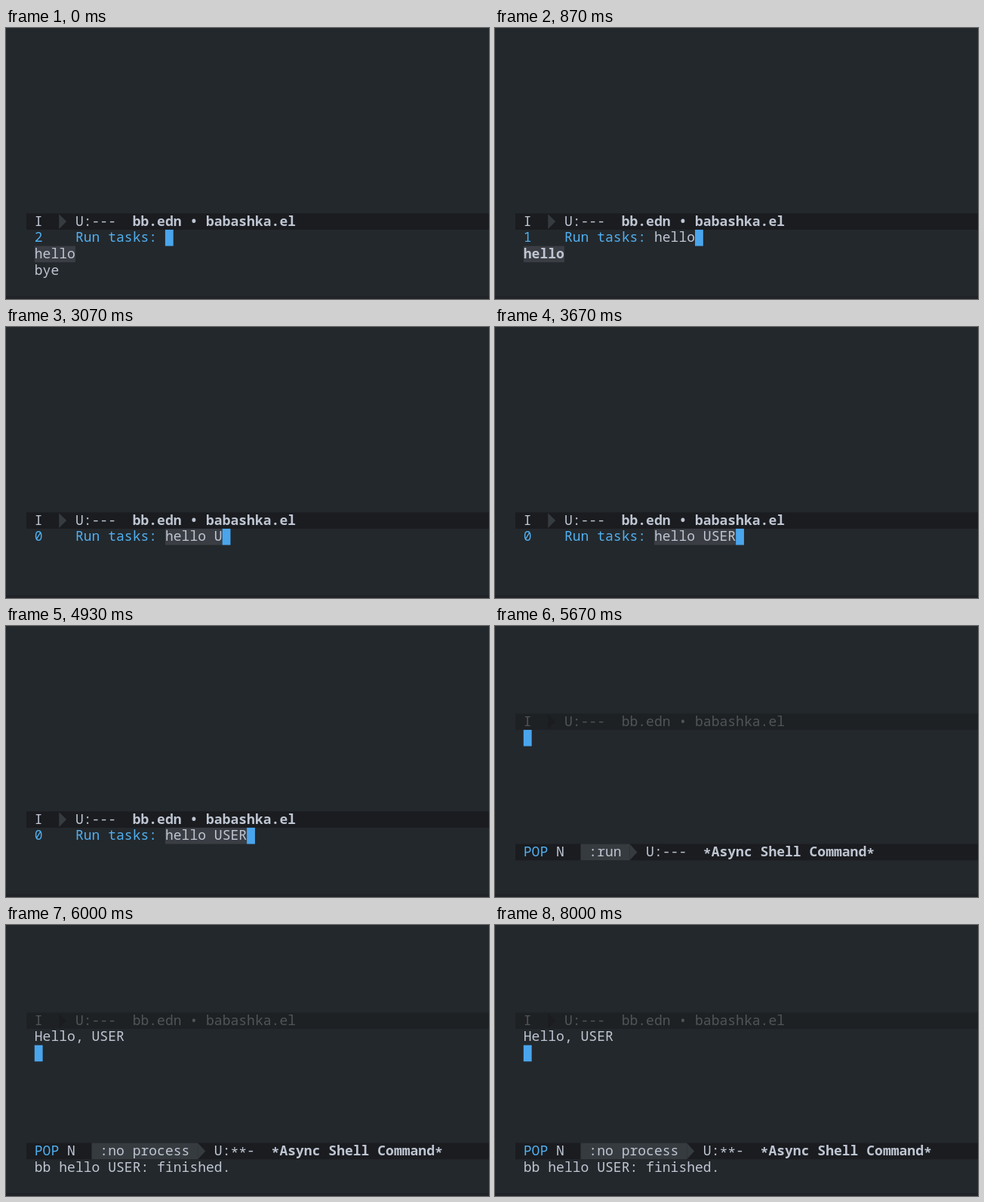
These frames come from a looping animation (640x360 px, 8.94 s). An HTML page with a canvas:

```html
<!DOCTYPE html>
<html lang="en">
<head>
<meta charset="utf-8">
<title>Run tasks</title>
<style>
  html, body { margin: 0; width: 100%; height: 100%; overflow: hidden; background: #23282c; }
  canvas { display: block; }
</style>
</head>
<body>
<canvas id="stage" width="640" height="360"></canvas>
<script>
const ctx = document.getElementById('stage').getContext('2d');
const LOOP = 8940;
const CELL = 10.82, ROW = 21.66, LEFT = 37.8, TOP = 116.3;
const BG = '#23282c', BAR = '#1a1c20', DIM_BAR = '#1e2124', EDGE = '#202428';
const FG = '#bfc6d2', DIM = '#505458', BLUE = '#51afef', CURSOR = '#4aa5ec';
const HIGHLIGHT = '#3a3d43', SEGMENT = '#363b40';

// Time at which each character of the input appears
const INPUT = 'hello USER';
const KEY_TIMES = [70, 270, 400, 600, 800, 1000, 3000, 3200, 3470, 3600];
const POPUP = 5670, FINISHED = 5800;

const colX = col => LEFT + col * CELL;
const rowY = row => TOP + row * ROW;

function fill(x, y, w, h, color) {
  ctx.fillStyle = color;
  ctx.fillRect(x, y, w, h);
}

function cells(col, row, count, color) {
  fill(colX(col), rowY(row), count * CELL, ROW, color);
}

function text(str, col, row, color = FG, weight = 500) {
  ctx.font = `${weight} 18px "Noto Sans Mono", monospace`;
  ctx.fillStyle = color;
  [...str].forEach((ch, i) => {
    const drop = ch === '*' ? 3 : 0; // asterisks sit at mid-height
    ctx.fillText(ch, colX(col + i), rowY(row) + 16.4 + drop);
  });
}

function bar(row, color) {
  fill(27, rowY(row), 613, ROW, color);
}

function arrow(col, row, color = SEGMENT, inset = 0) {
  const x = colX(col), top = rowY(row) + inset, bottom = rowY(row + 1) - inset;
  ctx.fillStyle = color;
  ctx.beginPath();
  ctx.moveTo(x, top);
  ctx.lineTo(x + 10, (top + bottom) / 2);
  ctx.lineTo(x, bottom);
  ctx.fill();
}

function drawPrompt(t) {
  const typed = KEY_TIMES.filter(time => t >= time).length;
  const hasArgument = typed > 6;
  const count = hasArgument ? 0 : typed ? 1 : 2;

  bar(6, BAR);
  text('I', 0, 6);
  arrow(3, 6, SEGMENT, 1);
  text('U:---', 5, 6);
  text('bb.edn • babashka.el', 12, 6, FG, 700);

  text(String(count), 0, 7, BLUE);
  text('Run tasks:', 5, 7, BLUE);
  if (hasArgument) cells(16, 7, typed, HIGHLIGHT);
  text(INPUT.slice(0, typed), 16, 7);
  cells(16 + typed, 7, 1, CURSOR);

  if (hasArgument) return;
  const matched = Math.min(typed, 5);
  cells(0, 8, 5, HIGHLIGHT);
  text('hello'.slice(0, matched), 0, 8, FG, 700);
  text('hello'.slice(matched), matched, 8);
  if (!typed) text('bye', 0, 9);
}

function drawPopup(finished) {
  bar(0, DIM_BAR);
  arrow(3, 0, BAR, 1);
  text('I    U:---  bb.edn • babashka.el', 0, 0, DIM);

  if (finished) {
    text('Hello, USER', 0, 1);
    text('bb hello USER: finished.', 0, 9);
  }
  cells(0, finished ? 2 : 1, 1, CURSOR);

  const status = finished ? ' :no process ' : ' :run ';
  const end = 7 + status.length;
  bar(8, BAR);
  text('POP', 0, 8, BLUE);
  text('N', 4, 8);
  cells(7, 8, status.length, SEGMENT);
  arrow(end, 8);
  text(status, 7, 8);
  text(finished ? 'U:**-' : 'U:---', end + 2, 8);
  text('*Async Shell Command*', end + 9, 8, FG, 700);
}

function draw(now) {
  const t = now % LOOP;
  fill(0, 0, 640, 360, BG);
  fill(0, 356, 640, 4, EDGE);
  if (t < POPUP) drawPrompt(t);
  else drawPopup(t >= FINISHED);
}

const start = performance.now();
function tick() {
  draw(performance.now() - start);
  requestAnimationFrame(tick);
}
tick();
</script>
</body>
</html>
```
